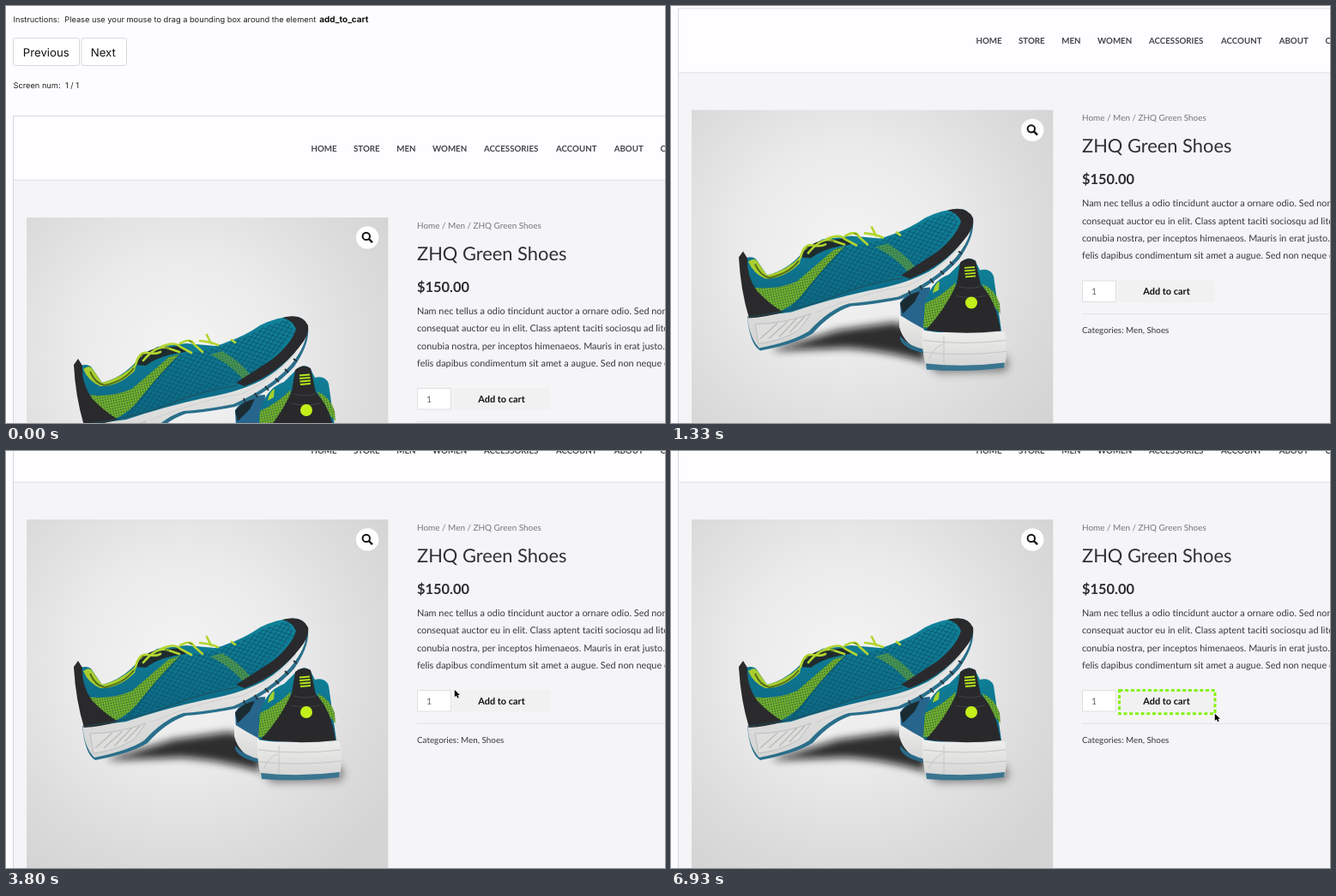
Recreate the animation shown at these times as an HTML page. Size 768x487 px, loop 6990 ms.

```html
<!DOCTYPE html>
<html lang="en">
<head>
<meta charset="utf-8">
<title>Bounding box task</title>
<style>
  html, body { margin: 0; width: 100%; height: 100%; overflow: hidden; background: #fdfcfe; }
  svg { display: block; width: 768px; height: 487px; }
  text { text-rendering: geometricPrecision; }
  .ui { font-family: Inter, "Liberation Sans", sans-serif; font-size: 9.25px; fill: #222; }
  .btn { font-size: 13.2px; fill: #111; }
  .shop { font-family: Lato, "Open Sans", sans-serif; fill: #38383c; }
  .nav { font-size: 9.72px; font-weight: 700; fill: #444448; }
  .para { font-size: 10.9px; }
  .small { font-size: 9.85px; }
  .bold { font-weight: 700; }
</style>
</head>
<body>
<svg viewBox="0 0 768 487" xmlns="http://www.w3.org/2000/svg">
  <defs>
    <radialGradient id="backdrop" gradientUnits="userSpaceOnUse" cx="205" cy="412" r="300">
      <stop offset="0" stop-color="#f4f4f5"/>
      <stop offset=".4" stop-color="#ebebec"/>
      <stop offset=".75" stop-color="#dcdcdd"/>
      <stop offset="1" stop-color="#d4d4d5"/>
    </radialGradient>
    <linearGradient id="teal" x1="0" y1="0" x2="0" y2="1">
      <stop offset="0" stop-color="#10839a"/>
      <stop offset="1" stop-color="#0d6683"/>
    </linearGradient>
    <linearGradient id="rubber" x1="0" y1="0" x2="0" y2="1">
      <stop offset="0" stop-color="#efefed"/>
      <stop offset="1" stop-color="#d3d4d3"/>
    </linearGradient>
    <pattern id="mesh" width="8" height="6" patternUnits="userSpaceOnUse" patternTransform="rotate(-18)">
      <path d="M0 0L8 6M8 0L0 6" stroke="#0a566e" fill="none"/>
    </pattern>
    <pattern id="dots" width="3" height="3" patternUnits="userSpaceOnUse" patternTransform="rotate(-12)">
      <rect width="3" height="3" fill="#7dbb2c"/>
      <circle cx="1.5" cy="1.5" r=".95" fill="#2b6038"/>
    </pattern>
    <filter id="soft" x="-20%" y="-60%" width="140%" height="220%"><feGaussianBlur stdDeviation="5"/></filter>
  </defs>
  <rect width="768" height="487" fill="#fdfcfe"/>

  <g id="page">
    <g class="ui">
      <text x="8.5" y="18.8">Instructions:</text>
      <text x="68.3" y="18.8">Please use your mouse to drag a bounding box around the element</text>
      <text x="365.3" y="18.8" class="bold" style="font-size:9.95px;fill:#111">add_to_cart</text>
      <g fill="#fff" stroke="#d9d8dc">
        <rect x="8.5" y="37.5" width="77" height="32" rx="2"/>
        <rect x="88" y="37.5" width="52.5" height="32" rx="2"/>
      </g>
      <text x="19.8" y="58.8" class="btn">Previous</text>
      <text x="98.8" y="58.8" class="btn">Next</text>
      <text x="8.5" y="95.5">Screen num:</text>
      <text x="69" y="95.5">1 / 1</text>
    </g>

    <rect x="8.5" y="128.5" width="800" height="700" fill="#f5f4f7" stroke="#d6d5d9"/>
    <rect x="9" y="129" width="800" height="74" fill="#fefdff"/>
    <path d="M9 203.3H768" stroke="#e2e1e5"/>

    <g id="nav" class="shop nav"></g>

    <rect x="24" y="247" width="421.3" height="440" fill="url(#backdrop)"/>
    <g transform="translate(0 167)">
      <path d="M120 359Q160 348 195 337L260 328L296 338V374Q250 361 205 358Q150 360 120 361Z" fill="#0c0c0c" opacity=".85" filter="url(#soft)"/>
      <path d="M294 372L388 366Q400 378 388 386L310 388Z" fill="#333" opacity=".5" filter="url(#soft)"/>

      <!-- rear shoe -->
      <path d="M267 305Q278 288 302 287L300 345L268 324Z" fill="#27658d"/>
      <path d="M267 306Q276 294 290 292L284 304L270 318Z" fill="#1b2b32"/>
      <path d="M266 319Q280 328 297 337V363Q272 356 266 333Z" fill="url(#rubber)"/>
      <path d="M267 344Q277 356 297 360V364Q272 360 267 348Z" fill="#2a6a88"/>
      <path d="M295 340L294 312Q301 280 324 272L338 258Q348 249 355 257L360 267Q372 264 376 274L385 338Z" fill="url(#teal)"/>
      <path d="M294 334L296 306Q316 297 332 281L329 300L305 334Z" fill="url(#dots)"/>
      <path d="M363 283Q378 290 383 306L384 318L370 302Z" fill="url(#dots)"/>
      <path d="M297 337Q320 312 333 283L337 258Q346 250 355 256L361 284Q379 302 384 338Q340 343 297 337Z" fill="#29292b"/>
      <path d="M335 286Q348 290 361 286M332 297Q348 301 366 297" stroke="#414245" fill="none"/>
      <path d="M305 294Q307 283 313 280L312 290Z" fill="#a3d02c"/>
      <path d="M342 264.5L354 263.5M342 268L354.5 267M342.5 271.5L355 270.5M343 275L355 274" stroke="#b4e61f" stroke-width="1.8"/>
      <circle cx="350" cy="305" r="7" fill="#c3f01a"/>
      <path d="M293 337Q340 345 389 339Q393 360 389 379Q340 386 297 380Q292 360 293 337Z" fill="url(#rubber)"/>
      <path d="M294 349Q340 355 390 349M294 363Q340 368 391 362M318 344V380M300 371Q308 356 316 354" stroke="#c4c5c4" fill="none"/>
      <path d="M297 376Q342 381 389 375L388 381Q342 387 298 383Z" fill="#3a7590"/>

      <!-- front shoe -->
      <path d="M89 322L130 312L180 300L270 276L320 246L352 209Q354 228 336 254Q310 283 267 301Q232 308 210 309Q186 317 165 341Q146 353 104 361Q92 354 89 322Z" fill="#2a6f8b"/>
      <path d="M89 320L130 310L180 298L270 274L320 244L350 213Q350 230 332 252Q308 279 265 298Q228 305 207 306Q184 313 161 338Q143 350 103 358Q91 346 89 320Z" fill="url(#rubber)"/>
      <path d="M98 330Q130 330 163 318L149 337Q128 350 102 353Z" fill="#dededc" stroke="#bcbebd"/>
      <path d="M104 347L124 329M114 347L136 327M126 345L147 323M138 340L156 321" stroke="#b9bbba" stroke-width="1.4"/>
      <path d="M168 317Q230 291 275 286Q312 268 338 238" fill="none" stroke="#cfd0cf"/>
      <path d="M277 291L279 296M290 285L293 290M302 277L306 282M314 268L318 272M325 257L329 261M335 245L339 248" stroke="#27343c" stroke-width="1.8"/>
      <path d="M82 256Q92 249 99 254L112 273Q135 267 152 248L176 231L210 227L244 230Q275 221 296 206Q320 194 341 196Q353 202 351 216Q332 250 300 269Q272 284 230 291Q184 301 140 316L92 322Q80 286 82 256Z" fill="url(#teal)"/>
      <path d="M150 280L205 240L246 232Q280 221 300 208L328 199L336 214Q310 248 276 270L194 296L140 313Z" fill="url(#mesh)"/>
      <path d="M90 257Q97 252 100 256L112 273Q136 267 152 250L150 259Q132 277 110 277Q96 271 90 257Z" fill="#a9cc2f"/>
      <path d="M98 260Q104 274 115 276Q138 271 149 256" fill="none" stroke="#526f19" stroke-width="2"/>
      <path d="M87 286Q120 292 147 280Q168 262 190 243L204 239Q182 260 160 288Q144 308 127 315Q102 306 87 286Z" fill="url(#dots)"/>
      <path d="M238 240Q262 252 276 269L286 265Q272 247 252 236Z" fill="url(#dots)" opacity=".6"/>
      <path d="M204 239Q182 260 160 288L140 313" fill="none" stroke="#0b5a70" stroke-width="1.5"/>
      <path d="M149 252Q160 235 178 232L205 230L210 237Q180 240 163 253Z" fill="#1f2c2e"/>
      <path d="M79 252L84 245L89 253Q88 274 100 291Q115 307 131 316Q110 322 91 323Q81 290 79 252Z" fill="#2a2a2c"/>
      <path d="M322 197Q345 191 352 206Q354 217 342 231Q318 262 278 277L268 273Q290 259 311 245Q333 227 338 210Q334 200 322 197Z" fill="#2a2a2d"/>
      <path d="M89 322Q150 314 190 298T270 276" fill="none" stroke="#1f4c5a"/>
      <path d="M151 252Q155 236 165 238T180 237M160 247Q175 229 187 232L202 237M181 231Q196 224 203 231L216 238M203 227Q216 220 219 228L229 237M226 224Q238 225 247 229M234 217L239 227M263 223L267 226"
        fill="none" stroke="#b3d52f" stroke-width="2.7" stroke-linecap="round"/>
      <path d="M157 243L160 239M185 232L190 233M213 224L217 226" stroke="#6f8f19" stroke-width="1.5"/>
    </g>

    <circle cx="421.2" cy="270.4" r="13.2" fill="#fff"/>
    <g fill="none" stroke="#111" stroke-width="2">
      <circle cx="419.8" cy="268.9" r="4.2"/>
      <path d="M422.8 272L427 276.2" stroke-width="2.4"/>
    </g>

    <g class="shop">
      <text x="479" y="259.8" style="font-size:9.95px;fill:#77777b">Home / Men / ZHQ Green Shoes</text>
      <text x="479" y="296.5" style="font-size:21.87px;fill:#303034">ZHQ Green Shoes</text>
      <text x="479" y="333.6" class="bold" style="font-size:16.4px;fill:#2c2c30">$150.00</text>
      <g id="para" class="para"></g>
      <rect x="479.5" y="446.5" width="39" height="24.5" fill="#fff" stroke="#dfdee2"/>
      <text x="490" y="462.8" style="font-size:10.5px;fill:#666">1</text>
      <rect x="521" y="446" width="113" height="25.5" fill="#f1f1f2"/>
      <text x="550.3" y="462.9" class="bold" style="font-size:10.93px;fill:#111">Add to cart</text>
      <path d="M479 485.3H768" stroke="#e2e1e5"/>
      <text x="479" y="508" class="small">Categories: Men, Shoes</text>
    </g>
  </g>

  <rect id="box" fill="none" stroke="#84f20a" stroke-width="3" stroke-dasharray="4 2.7"/>
  <g id="pointer">
    <circle id="press" r="13" fill="none" stroke="#111" stroke-width="1.1"/>
    <path d="M0 0V8.3L2 6.6L3.4 9.6L4.9 8.9L3.6 6H6.2Z" fill="#000" stroke="#fff" stroke-width=".7" paint-order="stroke"/>
  </g>
</svg>

<script>
const LOOP = 6990, STEP = 200 / 3;
const $ = id => document.getElementById(id);

function addText(parent, x, y, value) {
  const node = document.createElementNS("http://www.w3.org/2000/svg", "text");
  node.setAttribute("x", x);
  node.setAttribute("y", y);
  node.textContent = value;
  parent.append(node);
}

Object.entries({ HOME: 355.5, STORE: 405, MEN: 455.3, WOMEN: 497, ACCESSORIES: 557,
  ACCOUNT: 641, ABOUT: 708.7, CONTACT: 762.5 })
  .forEach(([label, x]) => addText($("nav"), x, 169.7, label));

["Nam nec tellus a odio tincidunt auctor a ornare odio. Sed non mauris",
  "consequat auctor eu in elit. Class aptent taciti sociosqu ad litora torquent",
  "conubia nostra, per inceptos himenaeos. Mauris in erat justo. Nullam ac",
  "felis dapibus condimentum sit amet a augue. Sed non neque elit. Sed ut"]
  .forEach((line, i) => addText($("para"), 479, 360 + i * 20.3, line));

// Scroll keys: time, offset, speed in px/ms.
const SCROLL = [[356, 0, 0], [800, 14, .095], [1133, 78, .285], [1600, 159.5, .065], [1950, 167, 0]];

function scrollAt(t) {
  if (t <= SCROLL[0][0]) return 0;
  const i = SCROLL.findIndex(key => t < key[0]);
  if (i < 0) return 167;
  const [t0, y0, v0] = SCROLL[i - 1], [t1, y1, v1] = SCROLL[i];
  const d = t1 - t0, u = (t - t0) / d, w = 1 - u;
  return y0 * w * w * (1 + 2 * u) + y1 * u * u * (3 - 2 * u) + d * u * w * (v0 * w - v1 * u);
}

function ease(t, from, to) {
  const u = Math.min(1, Math.max(0, (t - from) / (to - from)));
  return u < .5 ? 4 * u ** 3 : 1 - 4 * (1 - u) ** 3;
}

const show = (id, on) => $(id).setAttribute("visibility", on ? "visible" : "hidden");

function draw(t) {
  $("page").setAttribute("transform", `translate(0 ${-scrollAt(t).toFixed(2)})`);

  const approach = 1 - ease(t, 2250, 2950), drag = ease(t, 4115, 5100);
  const x = 522.8 + 29 * approach + 111 * drag;
  const y = 279 + 95 * approach + 27.7 * drag;
  $("pointer").setAttribute("transform", `translate(${x} ${y})`);
  show("pointer", t >= 2250);
  show("press", t >= 4000 && t < 5500);

  const box = { x: 522.5, y: 279.5, width: Math.max(0, x - 522.3), height: Math.max(0, y - 279.5) };
  for (const key in box) $("box").setAttribute(key, box[key]);
  show("box", drag > 0);
}

let start;
function tick(now) {
  start ??= now;
  const t = (now - start) % LOOP;
  draw(Math.floor((t + 4) / STEP) * STEP);
  requestAnimationFrame(tick);
}
draw(0);
requestAnimationFrame(tick);
</script>
</body>
</html>
```
